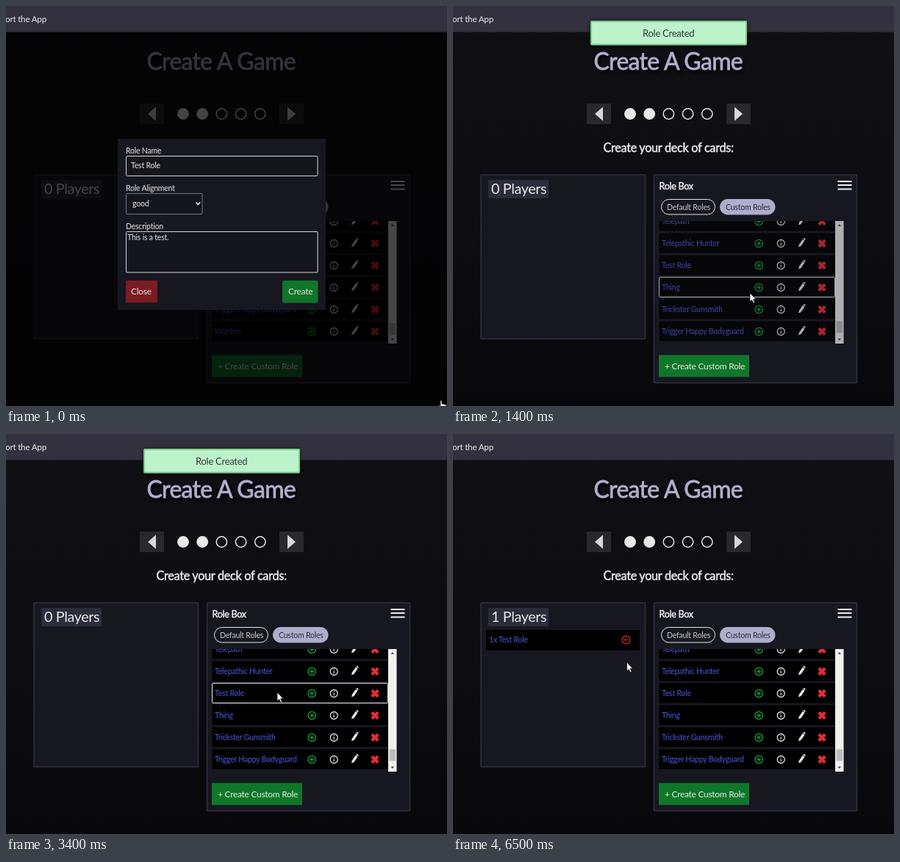
These frames come from a looping animation (600x545 px, 7.1 s). An HTML page:

```html
<!DOCTYPE html>
<html lang="en">
<head>
<meta charset="utf-8">
<title>Create A Game</title>
<style>
html, body { margin: 0; width: 100%; height: 100%; overflow: hidden; background: #0e0d11; }
svg { display: block; width: 600px; height: 545px; }
text { font: 10.5px Lato, "Open Sans", sans-serif; letter-spacing: -.02em; fill: #e8e8e8; }
.strong { stroke: #e8e8e8; stroke-width: .5; }
.title { font-size: 31.9px; fill: #b1aecf; stroke: #b1aecf; stroke-width: .8; filter: drop-shadow(2px 3px 2px #000); }
.button { font-size: 11.9px; }
.panel { fill: #171720; stroke: #302f40; stroke-width: 1.5; }
.field { fill: #15151d; stroke: #d8d8d8; }
.role { fill: #4a58d8; }
.line { fill: none; stroke: #e8e8e8; stroke-width: 1.3; }
</style>
</head>
<body>
<svg viewBox="0 0 600 545">
  <defs>
    <linearGradient id="night" x2="0" y2="1">
      <stop stop-color="#100f14"/><stop offset=".6" stop-color="#0d0c10"/><stop offset="1" stop-color="#08080b"/>
    </linearGradient>
    <clipPath id="listClip"><path d="M280 293h252v167h-252z"/></clipPath>
    <filter id="shadow" x="-10%" y="-50%" width="120%" height="200%">
      <feDropShadow dx="0" dy="1" stdDeviation="3.5" flood-opacity=".6"/>
    </filter>
    <g id="icons">
      <g fill="none" stroke-width="1.3">
        <path stroke="#17a23c" d="M131 14a5.200 5.200 0 1 0 10.400 0a5.200 5.200 0 1 0-10.400 0M133.200 14h6M136.200 11v6"/>
        <path stroke="#e0e0e0" d="M161.200 14a5 5 0 1 0 10 0a5 5 0 1 0-10 0M166.200 13.200v3.600M166.200 10.800v1.300"/>
      </g>
      <path fill="#e8e8e8" d="M190 19l.8-3.500 5-7.200 2.700 1.900-5 7.200zM196.300 7.700l.9-1.200q1.500-.3 2.500 1.800l-.8 1.200z"/>
      <path stroke="#e22d36" stroke-width="4.200" d="M217.800 9.800l8.400 8.400M226.200 9.800l-8.400 8.400"/>
    </g>
  </defs>

  <rect width="600" height="545" fill="url(#night)"/>
  <text class="title" x="191.500" y="87">Create A Game</text>
  <path fill="#29292c" d="M182 133h33v28h-33zM372 133h33v28h-33z"/>
  <path fill="#d8d8d8" d="M193 147l11-9.500v19zM394 147l-11-9.500v19z"/>
  <g id="steps" stroke="#e8e8e8" stroke-width="1.500"></g>
  <text class="strong" x="204.500" y="198.500" style="font-size:16.3px">Create your deck of cards:</text>

  <rect class="panel" x="38" y="230" width="223.500" height="223.500" rx="1"/>
  <rect x="48" y="237" width="82" height="25" rx="2" fill="#2d2c3b"/>
  <text id="players" x="52" y="256" style="font-size:19.800px"></text>
  <g id="chosen">
    <path d="M45 267h209v27.500h-209z"/>
    <text class="role" x="49" y="284">1x Test Role</text>
    <g fill="none" stroke="#d3202a" stroke-width="1.400"><circle cx="235.500" cy="280.500" r="5.300"/><path d="M232.500 280.500h6"/></g>
  </g>

  <rect class="panel" x="273.500" y="230" width="276" height="283.500" rx="1"/>
  <text class="strong" x="280.500" y="249.500" style="font-size:12.500px">Role Box</text>
  <path stroke="#f0f0f0" stroke-width="2" d="M523.500 239h19M523.500 244h19M523.500 249.500h19"/>
  <rect class="line" x="283.500" y="263.500" width="73" height="20.500" rx="10.200" style="stroke-width:1"/>
  <text x="291" y="277.500" style="fill:#c8c8c8">Default Roles</text>
  <rect x="363" y="263" width="75.500" height="21.500" rx="10.700" fill="#afaccc"/>
  <text x="371" y="277.500" style="fill:#2c2b3a">Custom Roles</text>
  <g id="list" clip-path="url(#listClip)">
    <g id="rows"></g>
    <path fill="#f0f0f0" d="M520 293h11.500v167h-11.500z"/>
    <path fill="#505050" d="M523.500 300l2.300-3 2.300 3zM523.500 453l2.300 3 2.300-3z"/>
    <rect id="thumb" x="521.500" width="8.500" height="16" fill="#bdbdbd"/>
  </g>
  <rect x="280" y="475.500" width="123" height="30" rx="1" fill="#0f7729"/>
  <text class="button" x="288" y="495">+ Create Custom Role</text>

  <g id="modal">
    <rect y="35" width="600" height="510" opacity=".71"/>
    <rect x="152" y="181" width="283" height="233" fill="#171720"/>
    <text x="163" y="201">Role Name</text>
    <rect class="field" x="163.500" y="204.500" width="260.500" height="27" rx="2"/>
    <text x="170" y="221">Test Role</text>
    <text x="163" y="251.500">Role Alignment</text>
    <rect class="field" x="163.500" y="255.500" width="103.500" height="28" rx="1" style="stroke:#777"/>
    <text x="172" y="272.500">good</text>
    <path class="line" d="M258.500 267.500l2.800 3 2.800-3" style="stroke-width:1.600"/>
    <text x="163" y="304">Description</text>
    <rect class="field" x="163.500" y="307.500" width="260.500" height="55.500" rx="1"/>
    <text x="165" y="319">This is a test.</text>
    <rect x="163" y="374" width="43" height="30" rx="1" fill="#7b1c22"/>
    <text class="button" x="170" y="393">Close</text>
    <rect id="create" x="376.500" y="374.500" width="47.500" height="29.500" rx="1"/>
    <text class="button" x="384" y="393">Create</text>
  </g>

  <path fill="#33313f" d="M0 0h600v35.500h-600z"/>
  <text x="55" y="22" text-anchor="end" style="font-size:11.700px">Support the App</text>
  <g id="toast">
    <rect x="188" y="21" width="211" height="31.500" rx="1" fill="#bdf3cb" stroke="#7ecb8c" stroke-width="2" filter="url(#shadow)"/>
    <text x="258" y="41.500" style="font-size:13px;fill:#33383a">Role Created</text>
  </g>

  <g id="cursor">
    <path id="arrow" fill="#fff" stroke="#000" stroke-width=".7" d="M0 0v12l2.700-2.500 2 4.200 1.900-.9-2-4.100h3.700z"/>
    <path id="hand" fill="#fff" stroke="#000" stroke-width=".7" d="M-1 1q1-1.500 2 0v4l5 1q1.500.5 1.200 2.500l-1 4.500h-5.500l-4-5q0-1.500 1.500-1l.8.800z"/>
    <path id="beam" fill="none" stroke="#000" stroke-width="1.200" d="M-2-6h4M0-6v13M-2 7h4"/>
  </g>
</svg>
<script>
const LOOP = 7100, STEP = 100;
const CLOSE_AT = 1200, ADD_AT = 4600;
const ROLES = ["Telepath", "Telepathic Hunter", "Test Role", "Thing", "Trickster Gunsmith", "Trigger Happy Bodyguard"];
const OLD_ROLES = ROLES.filter(name => name !== "Test Role").concat("Warden");
// Pointer stops: time, x, y
const PATH = [
  [0, 592, 537], [800, 404, 391], [1600, 404, 391], [2100, 484.5, 371], [2400, 500, 361],
  [3200, 369, 352], [3600, 369, 352], [4200, 416, 352], [5100, 416, 352],
  [5500, 314, 331], [5900, 265, 319], [6200, 236.5, 311], [LOOP, 236.5, 311]
];

const $ = id => document.getElementById(id);
const show = (id, on) => $(id).style.display = on ? "" : "none";
const ramp = (t, from, to) => Math.min(1, Math.max(0, (t - from) / (to - from)));

$("steps").innerHTML = [0, 1, 2, 3, 4].map(i =>
  `<circle cx="${241 + i * 26.2}" cy="147" r="7.2" fill="${i < 2 ? "#e8e8e8" : "none"}"/>`).join("");
$("rows").innerHTML = ROLES.map((_, i) =>
  `<g transform="translate(280 ${279.5 + i * 30})"><rect x=".5" width="239" height="27" rx="1"/>
   <text class="role" x="4" y="17.5"></text><use href="#icons"/></g>`).join("");
const rows = [...$("rows").children];

function pointer(t) {
  const i = PATH.findIndex(stop => stop[0] > t);
  const [t0, x0, y0] = PATH[i - 1], [t1, x1, y1] = PATH[i];
  const k = ramp(t, t0, t1), e = k * k * (3 - 2 * k);
  return [x0 + (x1 - x0) * e, y0 + (y1 - y0) * e];
}

function draw(t) {
  const open = t < CLOSE_AT, added = t >= ADD_AT;
  const [x, y] = pointer(t);
  const hovered = !open && x > 280 && x < 520 ? Math.round((y - 293.5) / 30) : -1;

  rows.forEach((row, i) => {
    row.children[0].setAttribute("stroke", i === hovered ? "#e8e8e8" : "none");
    row.children[1].textContent = (open ? OLD_ROLES : ROLES)[i];
  });
  $("list").style.opacity = open ? 1 : .5 + .5 * ramp(t, CLOSE_AT, 1700);
  $("thumb").setAttribute("y", open ? 432 : 429.5);
  $("players").textContent = `${added ? 1 : 0} Players`;
  show("chosen", added);
  show("modal", open);

  const onCreate = x > 376 && x < 424 && y > 374 && y < 404;
  $("create").setAttribute("fill", onCreate ? "#34633f" : "#0f7529");
  $("create").setAttribute("stroke", onCreate ? "#178a35" : "#0f7529");
  $("toast").style.opacity = ramp(t, CLOSE_AT - 100, 1400) * (1 - ramp(t, 5700, 6200)) * !open;

  const kind = x > 560 || (hovered >= 0 && Math.abs(x - 416) < 7 && t > 3700) ? "hand"
    : hovered >= 0 && x < 364 ? "beam" : "arrow";
  for (const id of ["arrow", "hand", "beam"]) show(id, id === kind);
  $("cursor").setAttribute("transform", `translate(${x} ${y})`);
}

function frame() {
  draw(Math.floor(performance.now() % LOOP / STEP) * STEP);
  requestAnimationFrame(frame);
}
frame();
</script>
</body>
</html>
```
